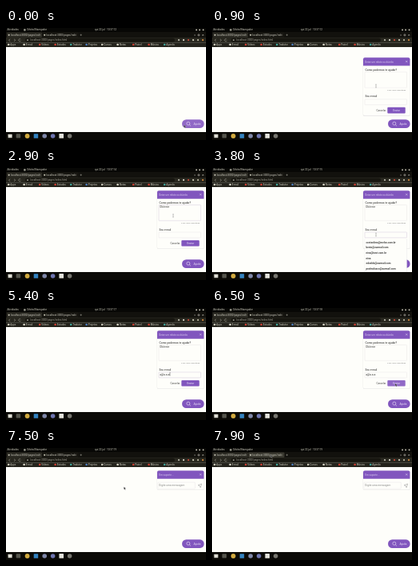
Animation of 250x141 px, one loop 8 s. Source, as an HTML page:

```html
<!DOCTYPE html>
<html lang="pt-BR">
<head>
<meta charset="utf-8">
<title>Suporte</title>
<style>
  html, body { margin: 0; width: 100%; height: 100%; overflow: hidden; background: #fefefa; }
  svg { display: block; width: 100vw; height: 100vh; }
  text { font-family: Roboto, Arial, sans-serif; font-size: 3.4px; fill: #333; white-space: pre; }
  .bar text { fill: #cbc9bd; font-size: 3.1px; }
</style>
</head>
<body>
<svg id="stage" viewBox="0 0 250 141" preserveAspectRatio="none"></svg>
<script>
const LOOP = 8000;
const PURPLE = '#8156be';
const HOVER = '#9068c6';
const PAPER = '#fefefa';
const stage = document.getElementById('stage');

function add(parent, tag, attrs = {}, content = '') {
  const el = document.createElementNS('http://www.w3.org/2000/svg', tag);
  for (const k in attrs) el.setAttribute(k, attrs[k]);
  el.textContent = content;
  return parent.appendChild(el);
}
const group = (p, attrs) => add(p, 'g', attrs);
const rect = (p, x, y, width, height, fill, more = {}) =>
  add(p, 'rect', { x, y, width, height, fill, ...more });
const dot = (p, cx, cy, r, fill, more = {}) => add(p, 'circle', { cx, cy, r, fill, ...more });
const line = (p, d, stroke, width = 0.5) =>
  add(p, 'path', { d, stroke, 'stroke-width': width, fill: 'none' });
const label = (p, x, y, str, style = '') => add(p, 'text', { x, y, style }, str);
const show = (el, on) => el.setAttribute('visibility', on ? 'visible' : 'hidden');
const move = (el, x, y) => el.setAttribute('transform', `translate(${x} ${y})`);

// Page, clipped between the browser bars and the taskbar
rect(stage, 0, 0, 250, 141, PAPER);
const clip = add(add(stage, 'defs'), 'clipPath', { id: 'page' });
rect(clip, 0, 24, 250, 107, '#fff');
const page = group(stage, { 'clip-path': 'url(#page)' });

// Help button
const help = rect(page, 220, 115.3, 27.6, 10.7, PURPLE, { rx: 5.35 });
dot(page, 227.8, 120.2, 2, 'none', { stroke: '#f0e8fa', 'stroke-width': 0.6 });
line(page, 'M229.2 121.6l1.8 1.8', '#f0e8fa', 0.6);
label(page, 234.6, 121.9, 'Ajuda', 'fill:#eee6fa');

function panel(height, title) {
  const g = group(page);
  rect(g, 188.7, 28.8, 59, height + 0.3, '#e4e3e4', { rx: 2 });
  rect(g, 189, 28.5, 58.4, height, PAPER, { rx: 2 });
  add(g, 'path', { d: 'M189 38.7V30.5a2 2 0 0 1 2-2h54.4a2 2 0 0 1 2 2v8.2z', fill: PURPLE });
  label(g, 191.2, 34.8, title, 'fill:#d9caee;font-size:3.1px');
  line(g, 'M242.2 32.4l2 2m0-2l-2 2', '#f4effb');
  return g;
}

// Contact form
const form = panel(73, 'Deixe um relato ou dúvida');
label(form, 191.5, 44.7, 'Como podemos te ajudar?', 'fill:#222');
const area = rect(form, 191, 46.5, 52.5, 19.8, PAPER, { rx: 0.6, 'stroke-width': 0.3 });
const message = label(form, 192.2, 49.8, '', 'font-size:3px');
const count = label(form, 242.3, 70, '', 'fill:#777;font-size:2.5px;text-anchor:end');
label(form, 191.5, 78.6, 'Seu e-mail', 'fill:#222;font-size:3.2px');
const field = rect(form, 191, 80.8, 52.5, 7, PAPER, { rx: 0.6, 'stroke-width': 0.3 });
const email = label(form, 192.2, 85.4, '');
label(form, 205.5, 95.9, 'Cancelar', 'fill:#444;font-size:3px');
const send = rect(form, 219.3, 91, 22.4, 7.6, PURPLE, { rx: 1 });
label(form, 230.5, 95.9, 'Enviar', 'fill:#eee6fa;font-size:3.2px;text-anchor:middle');

// Saved address list
const list = group(page);
rect(list, 190.8, 89, 52.7, 43, '#e2e1e2', { rx: 0.8 });
rect(list, 191, 89, 52.3, 43, PAPER, { rx: 0.8 });
['contavilma@melvo.com.br', 'bento@zurmail.com', 'nina@torvi.com.br', 'nina',
  'edvaldo@zurmail.com', 'pratinolasco@zurmail.com'].forEach((s, i) =>
  label(list, 192.5, 94.7 + i * 6.6, s, 'fill:#222;font-size:3.1px;font-weight:500'));

// Chat
const chat = panel(24, 'Em suporte...');
rect(chat, 189.8, 43.2, 46.5, 8, PAPER, { stroke: '#d8d6da', 'stroke-width': 0.3, rx: 0.8 });
label(chat, 191.3, 48.4, 'Digite uma mensagem', 'fill:#888;font-size:3.2px');
line(chat, 'M240.2 46.8l4.4-1.6-1.5 4.6-1-2z', '#888', 0.5);

// Browser and system bars
const bars = group(stage, { class: 'bar' });
rect(bars, 0, 0, 250, 5, '#070705');
label(bars, 1.5, 3.4, 'Atividades');
dot(bars, 23.4, 2.4, 1.3, '#9a9a8e');
label(bars, 26.3, 3.4, 'Orbital Navegador');
label(bars, 111, 3.4, 'qui 22 jul');
const clock = label(bars, 126, 3.4, '');
[238, 242, 246.5].forEach(x => rect(bars, x - 0.8, 1.5, 1.7, 1.7, '#d0cdbd', { rx: 0.5 }));

rect(bars, 0, 5, 250, 7, '#12110d');
rect(bars, 1, 5.6, 44, 6.4, '#2b2a23', { rx: 1 });
const tab = rect(bars, 45.5, 5.6, 45, 6.4, '#171611', { rx: 1 });
[3.7, 48.2].forEach(x => {
  dot(bars, x, 8.8, 1.1, '#c0beb0');
  label(bars, x + 2.4, 9.9, 'localhost:3000/pages/ind');
  line(bars, `M${x + 38} 8l1.6 1.6m0-1.6l-1.6 1.6`, '#c6c3b8', 0.4);
});
line(bars, 'M92.5 8.8h2.4m-1.2-1.2v2.4', '#c6c3b8', 0.4);
line(bars, 'M235 9h2M240 8h1.8v1.8h-1.8zM245.3 8l1.8 1.8m0-1.8l-1.8 1.8', '#d6d3c8', 0.5);

rect(bars, 0, 12, 250, 6.2, '#28271f');
rect(bars, 24, 12.8, 187, 4.7, '#171610', { rx: 2.3 });
line(bars, 'M5.2 13.8l-1.7 1.5 1.7 1.5M10 13.8l1.7 1.5-1.7 1.5M18.3 14.2a1.5 1.5 0 1 0 .3 1.7', '#bcbaae');
dot(bars, 27, 15.2, 0.9, '#aaa89c');
label(bars, 30.5, 16.3, 'localhost:3000/pages/index.html', 'fill:#a5a398');
['#b8b6aa', '#d8d6c8', '#c04a3a', '#d0ccb8', '#bab5a0', '#d0863c'].forEach((c, i) =>
  dot(bars, 216 + i * 6, 15.2, 1.1, c));

rect(bars, 0, 18.2, 250, 5.8, '#24231c');
const marks = ['Apps', 'E-mail', 'Vídeos', 'Estudos', 'Tradutor', 'Projetos', 'Cursos',
  'Notas', 'Painel', 'Música', 'Agenda'];
const tones = ['#c8c6b8', '#d8d6c8', '#cf4034', '#cf4034', '#3fa59a', '#4f7fc0'];
marks.forEach((s, i) => {
  const x = 2 + i * 19.5;
  rect(bars, x, 19.8, 2.3, 2.3, tones[i % tones.length], { rx: 0.5 });
  label(bars, x + 3.2, 22.2, s);
});

rect(bars, 0, 131, 250, 10, '#0c0b07');
rect(bars, 2.6, 133.8, 5, 4.5, '#dddcd2', { rx: 0.4 });
rect(bars, 12.6, 133.3, 5.6, 5.2, '#55554c', { rx: 0.8 });
dot(bars, 26.6, 136, 2.9, '#d1aa40');
rect(bars, 34.7, 133.2, 5.5, 5.5, '#3483c0', { rx: 0.5 });
dot(bars, 48.2, 136, 2.8, '#8088a8');
dot(bars, 58.6, 136, 2.8, '#6f76b0');
rect(bars, 66.4, 133, 5.6, 5.8, '#e5e4dc', { rx: 0.5 });
dot(bars, 79.6, 136, 2.8, '#77766e');

const cursor = group(stage);
const arrow = add(cursor, 'path', {
  d: 'M0 0v3.2l.8-.7.7 1.4.6-.3-.6-1.4h1z', fill: '#222', stroke: '#ddd', 'stroke-width': 0.25
});
const beam = line(cursor, 'M-.6 -2h1.2M0-2v4M-.6 2h1.2', '#555', 0.35);

// Pointer stops: time, x, y
const route = [
  [0, 222.5, 122], [500, 223, 122], [900, 205, 73], [1400, 209, 60], [3000, 209, 60],
  [3500, 205, 84], [5500, 205, 83], [6100, 229, 95], [6550, 229, 95],
  [7000, 204.5, 80], [7250, 204.5, 80], [7800, 73, 8.5], [LOOP, 73, 8.5]
];

function pointer(t) {
  const i = route.findIndex((r, k) => k && t <= r[0]);
  const [a, b] = [route[i - 1], route[i]];
  const p = (t - a[0]) / (b[0] - a[0]);
  const e = p * p * (3 - 2 * p);
  return [a[1] + (b[1] - a[1]) * e, a[2] + (b[2] - a[2]) * e];
}

function typed(str, t, start, end) {
  const p = Math.max(0, Math.min(1, (t - start) / (end - start)));
  return str.slice(0, Math.round(str.length * p));
}

// Panels rise from below and settle
function rise(t, start) {
  const left = 1 - Math.min(1, Math.max(0, (t - start) / 500));
  return 110 * left ** 3;
}

function render(t) {
  show(form, t >= 617 && t < 6650);
  move(form, 0, rise(t, 617));
  show(chat, t >= 7010);
  move(chat, 0, rise(t, 7010));
  show(list, t >= 3650 && t < 4350);

  const words = typed('Olá teste', t, 2000, 2900);
  const address = typed('a@a.a.a', t, 4300, 5000);
  const caret = Math.floor(t / 500) % 2 === 0 ? '|' : '';
  const onArea = t >= 1400 && t < 3600;
  const onField = t >= 3600 && t < 6300;
  message.textContent = words + (onArea ? caret : '');
  email.textContent = address + (onField ? caret : '');
  count.textContent = `${words.length} de 1000 caracteres`;
  area.setAttribute('stroke', onArea ? '#b8a8c8' : '#d8d6da');
  field.setAttribute('stroke', onField ? '#b8a8c8' : '#d8d6da');

  const [x, y] = pointer(t);
  const overText = t > 850 && t < 5700;
  help.setAttribute('fill', t < 700 ? HOVER : PURPLE);
  send.setAttribute('fill', t > 6000 && t < 6650 ? HOVER : PURPLE);
  tab.setAttribute('fill', t > 7650 ? '#3a3930' : '#171611');
  move(cursor, x, y);
  show(beam, overText);
  show(arrow, !overText);
  clock.textContent = `10:37:${12 + Math.floor(t / 1000)}`;
}

const begin = performance.now();
function tick() {
  render((performance.now() - begin) % LOOP);
  requestAnimationFrame(tick);
}
render(0);
requestAnimationFrame(tick);
</script>
</body>
</html>
```
